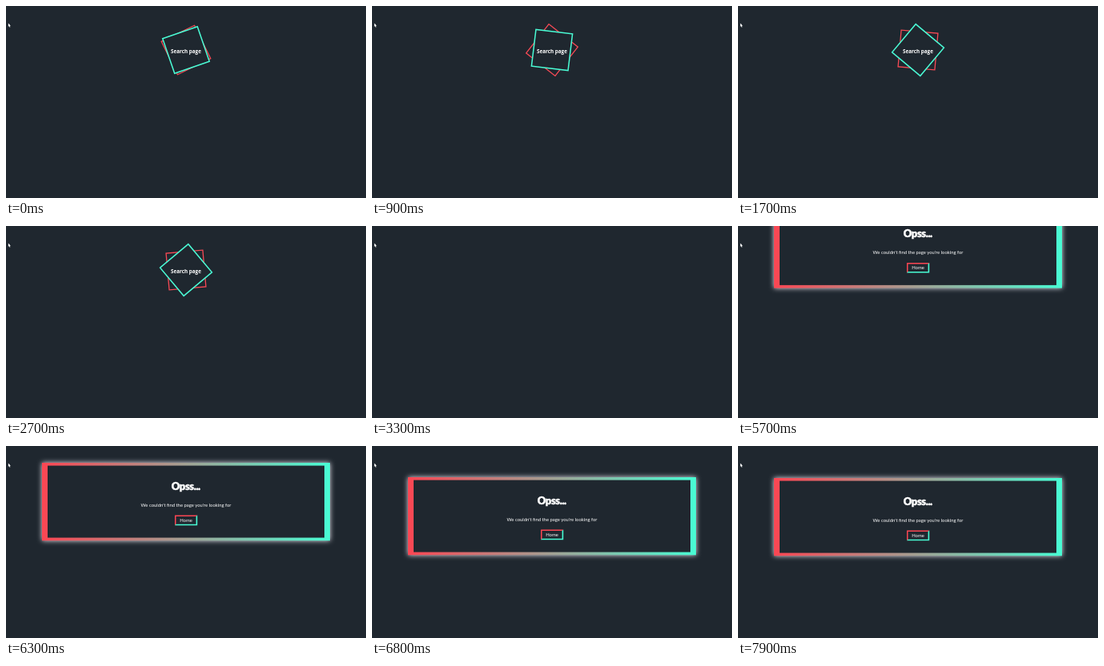
Recreate the animation shown at these times as an HTML page. Size 450 by 240 pixels, loop 8 s.

```html
<!DOCTYPE html>
<html lang="en">
<head>
<meta charset="utf-8">
<title>Search page</title>
<style>
  html, body { margin: 0; width: 100%; height: 100%; overflow: hidden; background: #1f272f; }
  svg { display: block; width: 100%; height: 100%; }
  text { fill: #fff; text-anchor: middle; }
  .label { font: 700 6.3px "Open Sans", sans-serif; }
  .title { font: 900 13px Lato, sans-serif; letter-spacing: -.4px; stroke: #fff; stroke-width: .45px; }
  .body { font: 400 5.9px Lato, sans-serif; }
</style>
</head>
<body>
<svg viewBox="0 0 450 240">
  <defs>
    <linearGradient id="edge">
      <stop offset="0" stop-color="#fb4653"/>
      <stop offset="1" stop-color="#48fcd4"/>
    </linearGradient>
    <filter id="blur" x="-10%" y="-30%" width="120%" height="160%">
      <feGaussianBlur stdDeviation="3.2"/>
    </filter>
  </defs>
  <rect width="450" height="240" fill="#1f272f"/>
  <g id="loader">
    <rect id="red" x="-23" y="-23" width="46" height="46" fill="none" stroke="#f94a55" stroke-width="1.3"/>
    <rect id="teal" x="-23" y="-23" width="46" height="46" fill="#1f272f" stroke="#4afcd5" stroke-width="1.5"/>
    <text class="label" x="225" y="59">Search page</text>
  </g>
  <g id="panel">
    <rect x="45" y="40" width="360" height="97.3" fill="#e6e4ee" filter="url(#blur)"/>
    <rect x="45" y="40" width="360" height="97.3" fill="url(#edge)"/>
    <rect x="52" y="43.6" width="346" height="90" fill="#1f272f"/>
    <text class="title" x="224.8" y="74">Opss...</text>
    <text class="body" x="225" y="95">We couldn't find the page you're looking for</text>
    <path d="M211 118.3V105.6H239.2l-1.6 1.5H212.5V116.8z" fill="#fb4653"/>
    <path d="M239.2 105.6V118.3H211l1.5-1.5H237.6V107.1z" fill="#48fcd4"/>
    <text class="body" x="225" y="114">Home</text>
  </g>
  <path d="M2.9 21.4V26l1-.9.8 1.6.7-.4-.7-1.5h1.2z" fill="#fff"/>
</svg>
<script>
  const LOOP = 8000, STEP = 100;
  const SPIN = [[0, 26], [1700, -95], [2700, -175], [3100, -204]];
  const $ = id => document.getElementById(id);
  const loader = $('loader'), red = $('red'), teal = $('teal'), panel = $('panel');

  function mix(keys, t) {
    for (let i = 1; i < keys.length; i++) {
      const [t0, v0] = keys[i - 1], [t1, v1] = keys[i];
      if (t <= t1) return v0 + (v1 - v0) * (t - t0) / (t1 - t0);
    }
    return keys[keys.length - 1][1];
  }

  const turn = (el, deg) => el.setAttribute('transform', `translate(225 55) rotate(${deg})`);
  const show = (el, on) => el.setAttribute('visibility', on ? 'visible' : 'hidden');

  function draw(t) {
    const angle = mix(SPIN, t);
    turn(red, -angle);
    turn(teal, angle - 45);
    show(loader, t < 3300);

    // the panel drops in and slows down until 6.9 s
    const left = Math.max(0, 6.9 - t / 1000);
    panel.setAttribute('transform', `translate(0 ${-44.2 * left ** 1.65})`);
    show(panel, t >= 4900);
  }

  const start = performance.now();
  function tick() {
    const t = (performance.now() - start) % LOOP;
    draw(Math.floor(t / STEP) * STEP);
    requestAnimationFrame(tick);
  }
  draw(0);
  requestAnimationFrame(tick);
</script>
</body>
</html>
```
